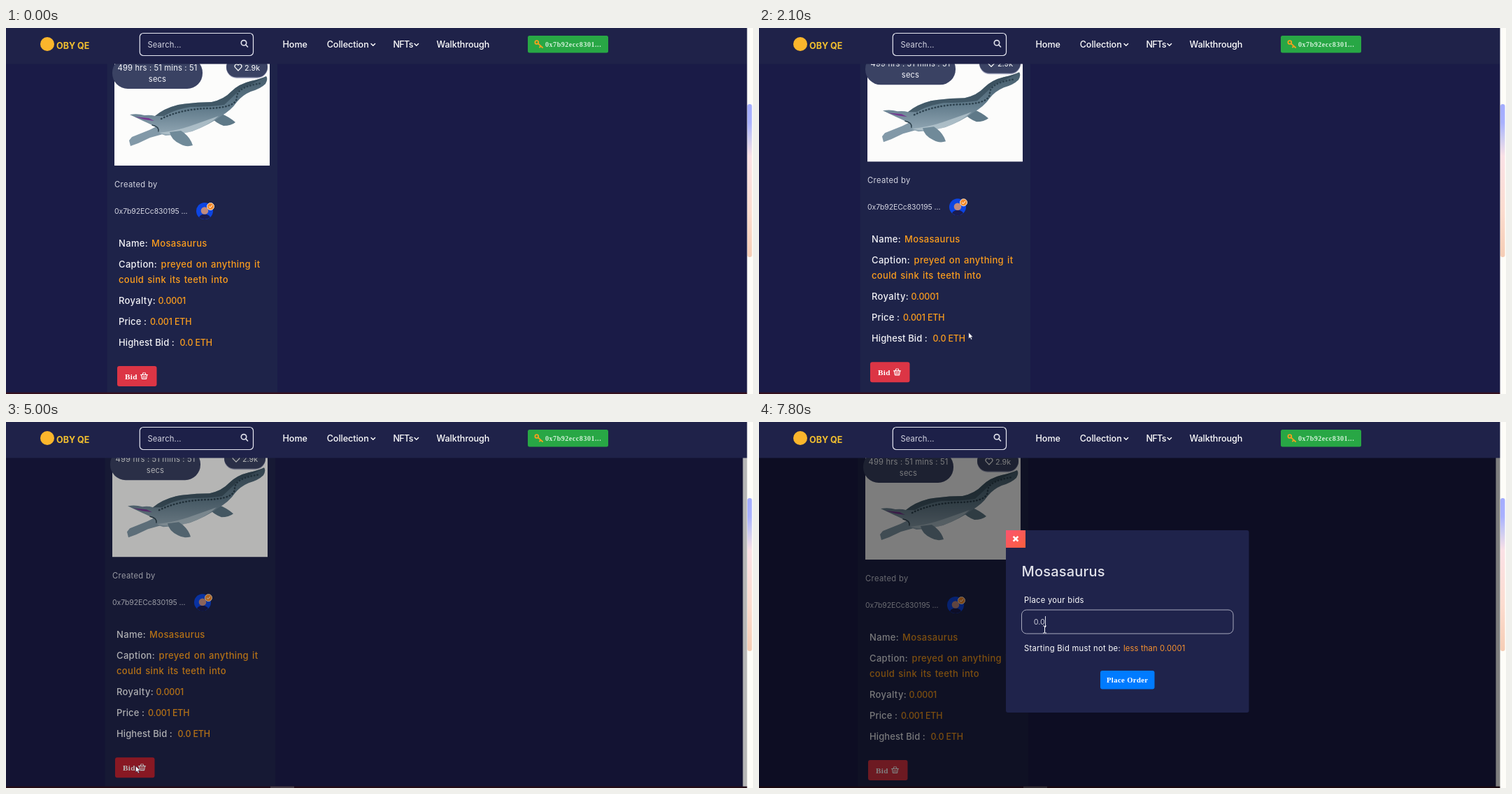
Write an HTML page that moves like this. It is 1068x524 px and loops after 8 s.

```html
<!DOCTYPE html>
<html lang="en">
<head>
<meta charset="utf-8">
<title>Bid dialog</title>
<style>
  html, body { margin: 0; width: 100%; height: 100%; overflow: hidden; background: #1a1b47; }
  svg { display: block; width: 1068px; height: 524px; }
  text { font: 400 11.2px Inter, sans-serif; fill: #fff; letter-spacing: .15px; }
  .nav { font-size: 12.6px; font-weight: 500; letter-spacing: -.05px; }
  .row { font-size: 13px; font-weight: 500; letter-spacing: .35px; word-spacing: 1.2px; fill: #f2f2f6; }
  .num { font-size: 12.4px; letter-spacing: -.1px; word-spacing: 0; }
  .tight { letter-spacing: .1px; word-spacing: 0; }
  .gold { fill: #fb9d1e; }
  .soft { fill: #d5d6e2; }
  .mid { text-anchor: middle; fill: #f4f5fa; }
  .btn { font: 700 10.6px "Liberation Serif", serif; letter-spacing: .4px; }
  .line { fill: none; stroke: #fff; stroke-linecap: round; stroke-linejoin: round; }
</style>
</head>
<body>
<svg viewBox="0 0 1068 524">
  <defs>
    <linearGradient id="thumb" x2="0" y2="1">
      <stop stop-color="#a3acff"/>
      <stop offset=".12" stop-color="#a9b1ff"/>
      <stop offset=".22" stop-color="#cccbf2"/>
      <stop offset=".34" stop-color="#fbe1e6"/>
      <stop offset=".7" stop-color="#fcdccf"/>
      <stop offset="1" stop-color="#f6cdb5"/>
    </linearGradient>
    <linearGradient id="warm" x2="1" y2="1">
      <stop stop-color="#fb5470"/>
      <stop offset="1" stop-color="#fa5f3c"/>
    </linearGradient>
    <linearGradient id="skin" x2="0" y2="1">
      <stop stop-color="#465d6c"/>
      <stop offset=".55" stop-color="#617b8b"/>
      <stop offset="1" stop-color="#93a8b5"/>
    </linearGradient>
  </defs>

  <rect width="1068" height="524" fill="#1a1b47"/>

  <g id="page">
    <g id="card">
      <rect x="144.500" y="-20" width="243.500" height="570" fill="#1e2349"/>
      <rect x="155" y="20" width="222" height="177" fill="#fcfcfb"/>
      <g id="reptile">
        <path fill="#8299a8" d="M217 140L205 146 180 156 176 161 178 169 189 165 206 157 224 152Z"/>
        <path fill="#5f7988" d="M292 127Q300 136 311 140 322 140 328 135 319 127 306 122Z"/>
        <path fill="url(#skin)" d="M177 124Q188 122 198 125 207 124 213 126 226 115 246 110 270 106 294 106 312 102 322 91 333 80 350 76 364 73 372 69 375 73 371 80 364 87 350 91 338 96 330 106 322 118 306 127 290 139 266 148 244 153 228 154 216 151 217 144 212 140 196 133 179 131Z"/>
        <path fill="#2f4552" d="M213 126Q226 115 246 110 270 106 294 106 312 102 322 91 333 80 350 76 364 73 372 69 352 81 336 87 326 97 312 110 294 113 264 113 240 117 226 126Z" opacity=".6"/>
        <path class="line" style="stroke:#2c414e" stroke-width="2.500" stroke-dasharray=".5 4" d="M222 130Q250 116 290 115T330 99 366 79"/>
        <path fill="#b9c8d0" d="M219 150Q246 147 270 138 290 131 304 126 288 141 262 149 238 155 219 150Z" opacity=".75"/>
        <path fill="#7089" d="M184 127L204 129 212 133 198 131Z"/>
        <path fill="#708a99" d="M234 149Q236 160 249 166 258 171 267 168 263 155 250 147Z"/>
        <path class="line" stroke-width="1.500" style="stroke:#2f434f" d="M209 139Q219 141 218 148"/>
      </g>
      <rect x="152" y="42" width="129" height="45" rx="22" fill="#3a4263"/>
      <text class="mid" x="216.500" y="60.500">499 hrs : 51 mins : 51</text>
      <text class="mid" x="216.500" y="77">secs</text>
      <rect x="315" y="42" width="59" height="30" rx="15" fill="#6b719a" opacity=".6"/>
      <rect x="315" y="41" width="59" height="29.500" rx="14.700" fill="#3a4263"/>
      <path class="line" stroke-width="1.200" d="M332 61L327.800 56.700C325.300 53.600 329.700 49.600 332 53.300C334.300 49.600 338.700 53.600 336.200 56.700Z"/>
      <text x="341" y="60.500" style="font-size:10.800px;letter-spacing:0">2.9k</text>

      <text class="soft" x="155" y="228" style="letter-spacing:.35px">Created by</text>
      <text class="soft" x="155" y="266" style="font-size:10.500px;letter-spacing:-.1px">0x7b92ECc830195 ...</text>
      <circle cx="284" cy="262" r="12" fill="#0d45e2"/>
      <path d="M276 271Q278 266.500 284 266.500T292 271Q284 277 276 271Z" fill="#1b1c50"/>
      <circle cx="284" cy="261.500" r="5.300" fill="#c08a80"/>
      <circle cx="292.500" cy="255.500" r="5" fill="#f58a2a" stroke="#ffe9cf"/>
      <path class="line" d="M290.300 255.700L292 257.300 294.800 253.800"/>

      <text class="row" x="161" y="312.500">Name:</text>
      <text class="row gold" x="208" y="312.500">Mosasaurus</text>
      <text class="row" x="161" y="342.500">Caption:</text>
      <text class="row gold" x="221.500" y="342.500">preyed on anything it</text>
      <text class="row gold" x="161" y="364.500">could sink its teeth into</text>
      <text class="row" x="161" y="394.500">Royalty:</text>
      <text class="row gold num" x="217.500" y="394.500">0.0001</text>
      <text class="row tight" x="161" y="424.500">Price :</text>
      <text class="row gold num" x="206" y="424.500">0.001 ETH</text>
      <text class="row tight" x="161" y="454.500">Highest Bid :</text>
      <text class="row gold num" x="248.500" y="454.500">0.0 ETH</text>

      <rect id="bid" x="159" y="484" width="56.500" height="29" rx="3"/>
      <text class="btn" x="170" y="502.500" style="font-size:11.200px">Bid</text>
      <path class="line" stroke-width="1.200" d="M192.500 496.500H202.500M193.500 497L194.500 502.500H200.500L201.500 497M195 496L196.500 493.500M200 496L198.500 493.500M196.300 498.500V501M198.700 498.500V501"/>
    </g>
  </g>

  <rect y="521.700" width="1060" height="2.300" fill="#34111f"/>
  <g id="gutter">
    <rect x="1053.500" y="51" width="7" height="470.700" fill="#fdfdfd"/>
    <rect x="378" y="521.700" width="34" height="2.300" fill="#67535f"/>
  </g>
  <rect id="veil" width="1060" height="524"/>

  <g id="modal">
    <rect x="353" y="155" width="347.500" height="261" rx="3" fill="#1f234b"/>
    <rect x="353" y="155" width="28" height="25" fill="url(#warm)"/>
    <path class="line" stroke-width="2.600" style="stroke-linecap:butt" d="M363.600 163.800L370.400 170.600M370.400 163.800L363.600 170.600"/>
    <text x="375.500" y="220.500" style="font-size:20px;font-weight:500;letter-spacing:.2px;fill:#e1e2ea">Mosasaurus</text>
    <text x="379" y="259" style="letter-spacing:.3px">Place your bids</text>
    <rect x="375.500" y="269" width="302.500" height="34" rx="7" fill="none" stroke="#a7a9bd"/>
    <text id="hint" x="395.500" y="290" style="fill:#a9abbd">Enter Starting Bid</text>
    <text id="typed" x="392.700" y="290" style="font-size:10.800px;letter-spacing:0;fill:#c9cad6"></text>
    <rect id="caret" y="278" width="1" height="16" fill="#e4e5ee"/>
    <text x="379" y="328" style="letter-spacing:.3px">Starting Bid must not be:</text>
    <text class="gold" x="521" y="328" style="fill:#f8922f">less than 0.0001</text>
    <rect x="488" y="356" width="77.500" height="26.500" rx="3" fill="#007bff"/>
    <text class="btn" x="497" y="373">Place Order</text>
  </g>

  <g id="header">
    <rect width="1060" height="51.500" fill="#1f2249"/>
    <circle cx="59" cy="23" r="10" fill="#fbb62c"/>
    <text x="72" y="30" style="font-size:12.500px;font-weight:700;letter-spacing:0;fill:#f3c02f">OBY QE</text>
    <rect x="191.300" y="7.500" width="162.200" height="32" rx="5" fill="#1d2048" stroke="#e6e7f1" stroke-width="1.200"/>
    <text class="soft" x="202.500" y="27.500">Search...</text>
    <g class="line" style="stroke:#dcdde8" stroke-width="1.700">
      <circle cx="340" cy="21.300" r="3.700"/>
      <path d="M342.800 24.200L345.500 27"/>
    </g>
    <text class="nav" x="395.500" y="28">Home</text>
    <text class="nav" x="458.700" y="28">Collection</text>
    <text class="nav" x="553.500" y="28" style="letter-spacing:-.7px">NFTs</text>
    <text class="nav" x="615.500" y="28">Walkthrough</text>
    <path class="line" stroke-width="1.400" d="M522 22.500L524.800 25.300 527.600 22.500M584 22.500L586.800 25.300 589.600 22.500"/>
    <rect x="746" y="11" width="115" height="24.500" rx="2.500" fill="#28a745"/>
    <g class="line" style="stroke:#f0a11f" stroke-width="1.900">
      <circle cx="758.800" cy="20.500" r="2.400"/>
      <path d="M761 22.500L767 28M764.500 26L763 27.500"/>
    </g>
    <text class="btn" x="771" y="27" style="font-size:10px;letter-spacing:.55px;fill:#d3f2da">0x7b92ecc8301...</text>
  </g>

  <rect x="1059.500" width="8.500" height="524" fill="#fefdf8"/>
  <rect x="1060" y="109" width="6.500" height="219" rx="3" fill="url(#thumb)"/>

  <g id="cursor">
    <path id="arrow" fill="#fff" stroke="#15163a" stroke-width=".5" d="M0 0V8.800L2 7 3.500 10.300 5 9.600 3.500 6.400H6.200Z"/>
    <path id="beam" class="line" d="M-2 -5H-.7L0 -4.300 .7 -5H2M0 -4.300V4.300M-2 5H-.7L0 4.300 .7 5H2"/>
  </g>
</svg>

<script>
const LOOP = 8000, TICK = 100;
const $ = id => document.getElementById(id);
const ramp = (t, from, to) => Math.min(1, Math.max(0, (t - from) / (to - from)));
const show = (id, on) => $(id).setAttribute('visibility', on ? 'visible' : 'hidden');
const move = (id, x, y) => $(id).setAttribute('transform', `translate(${x} ${y})`);
const within = (t, from, to) => t >= from && t < to;

// Last step whose time has come: [time, value]
const step = (t, table) => table.filter(s => s[0] <= t).pop()[1];

// Pointer path: time, x, y
const path = [
  [500, 900, 300], [600, 600, 325], [700, 400, 348], [800, 372, 353],
  [1000, 357, 358], [1300, 277, 399], [1400, 267, 401], [1500, 267, 401],
  [1600, 256, 404], [2000, 290, 430], [2400, 329, 454], [2500, 296, 443],
  [2600, 296, 443], [2700, 312, 448], [3200, 291, 444], [3400, 291, 444],
  [3500, 255, 460], [3600, 226, 468], [3700, 226, 468], [3800, 258, 416],
  [4000, 185.5, 492.5], [5500, 185.5, 492.5], [6000, 408.5, 297]
];
const bidFill = [[0, '#dc3545'], [4000, '#c82333'], [4800, '#bd2130'], [5600, '#dc3545']];
const entry = [[0, ''], [7000, '0'], [7200, '0.'], [7800, '0.0']];
const caretX = [392, 400, 402, 409];

function pointer(t) {
  const i = path.findIndex(p => p[0] > t);
  if (i < 0) return path[path.length - 1].slice(1);
  if (i === 0) return path[0].slice(1);
  const a = path[i - 1], b = path[i], k = ramp(t, a[0], b[0]);
  return [a[1] + (b[1] - a[1]) * k, a[2] + (b[2] - a[2]) * k];
}

function draw(t) {
  // Card rises under the pointer and sinks when the dialog opens
  const rest = t < 4900 ? (1 - ramp(t, 650, 950)) ** 1.2 : 1 - (1 - ramp(t, 4900, 5250)) ** 1.2;
  move('card', 0, -5.7 * (1 - rest));
  move('page', t >= 4900 ? -3 : 0, 0);
  show('gutter', t >= 4900);
  $('bid').setAttribute('fill', step(t, bidFill));

  $('veil').setAttribute('opacity', 0.5 * ramp(t, 4915, 5065));
  $('modal').setAttribute('opacity', ramp(t, 5100, 5220));
  move('modal', 0, -29 * (1 - ramp(t, 5080, 5380)) ** 1.3);

  const text = step(t, entry);
  $('typed').textContent = text;
  show('hint', !text);
  show('caret', within(t, 6000, 6200) || within(t, 6800, 7700) || t >= 7800);
  $('caret').setAttribute('x', caretX[text.length]);

  const beam = within(t, 2500, 3500) || t >= 5900;
  move('cursor', ...pointer(t));
  show('arrow', t >= 500 && !beam);
  show('beam', beam);
}

function frame() {
  const t = performance.now() % LOOP;
  draw(Math.floor(t / TICK) * TICK);
  requestAnimationFrame(frame);
}
frame();
</script>
</body>
</html>
```
